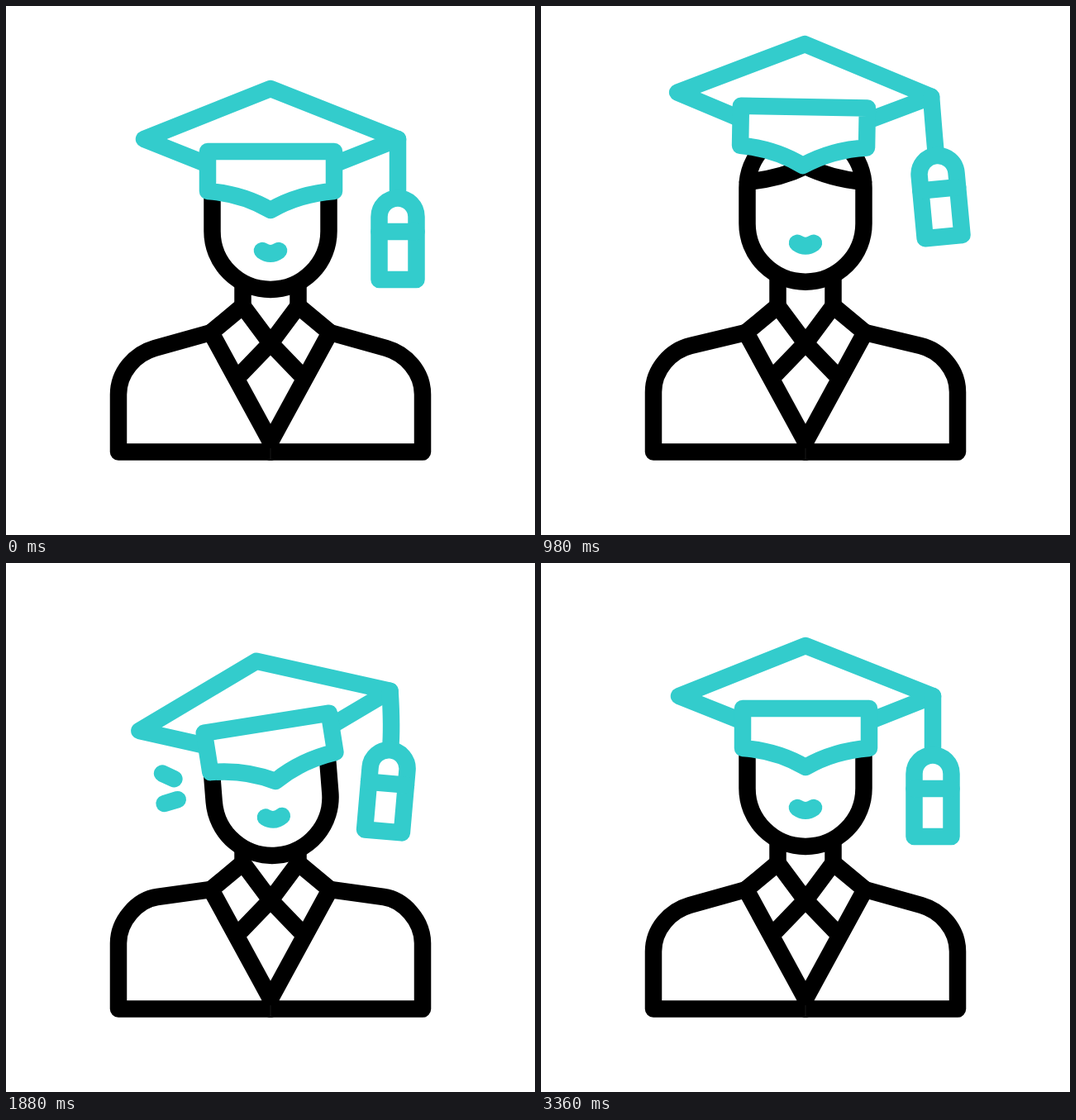
These frames come from a looping animation (640x640 px, 3.6 s). An HTML page:

```html
<!DOCTYPE html>
<html lang="en">
<head>
<meta charset="utf-8">
<title>Graduate</title>
<style>
  html, body { margin: 0; width: 100%; height: 100%; overflow: hidden; background: #fff; }
  svg { display: block; width: 100vw; height: 100vh; }
  .line { fill: none; stroke: #000; stroke-width: 20.5; stroke-linecap: round; stroke-linejoin: round; }
  .accent { stroke: #33cccc; }
  .solid { fill: #fff; }
</style>
</head>
<body>
<svg viewBox="0 0 640 640">
  <g class="line">
    <g id="half">
      <path id="shoulder"/>
      <path d="M286.5 322V363"/>
      <path d="M248 395L286.5 363L320 408L359.5 449"/>
      <path d="M248 395L320 527V539.600"/>
    </g>
    <use href="#half" transform="matrix(-1 0 0 1 640 0)"/>
  </g>
  <path d="M320 535V550" stroke="#333" stroke-width=".5"/>

  <g id="head" class="line">
    <path class="solid" d="M249.5 229a70.5 70.5 0 0 1 141 0V272.500a70.5 70.5 0 0 1 -141 0Z"/>
    <path d="M250 222Q290 218 320 203Q350 218 390 222"/>
    <path class="accent" d="M310 296Q320 303 330 296"/>
  </g>

  <g class="line accent">
    <g id="sparks">
      <path d="M216 267L177 249"/>
      <path d="M222 282L178 295"/>
    </g>
    <g id="cap">
      <path class="solid" d="M167 161L320 100L474 161L320 222Z"/>
      <path class="solid" d="M244 176H397V224Q355 227 320 247Q286 227 244 224Z"/>
    </g>
    <path id="string"/>
    <g id="tassel">
      <path class="solid" d="M-22.5 76V0a22.5 22.5 0 0 1 45 0V76Z"/>
      <path d="M-22.5 18H22.5"/>
    </g>
  </g>
</svg>
<script>
const LOOP = 3600;
// rest, crouch, peak, fall, land, rebound, rest
const BEATS = [0, 420, 1140, 1540, 1900, 2390, 2800];
// turning points of the tassel's pendulum
const SWINGS = [300, 780, 1170, 1565, 2110, 2480, 2800];

const el = id => document.getElementById(id);
const rad = deg => deg * Math.PI / 180;
const clamp = p => Math.max(0, Math.min(1, p));
const ease = p => clamp(p) ** 2 * (3 - 2 * clamp(p));

// Smooth curve from rest through the given values and back; it stands still at every turning point.
function through(t, times, ...values) {
  const v = [0, ...values, 0];
  const i = times.findIndex(time => time > t) - 1;
  if (i < 0) return 0;
  const slope = k => {
    const turns = (v[k] - v[k - 1]) * (v[k + 1] - v[k]);
    return turns > 0 ? (v[k + 1] - v[k - 1]) / (times[k + 1] - times[k - 1]) : 0;
  };
  const span = times[i + 1] - times[i], p = (t - times[i]) / span, q = 1 - p;
  return v[i] + (v[i + 1] - v[i]) * ease(p) + span * p * q * (slope(i) * q - slope(i + 1) * p);
}

function poseAt(t) {
  const capX = through(t, BEATS, 0, -4, -7.5, 1.5, -0.7);
  const capY = through(t, BEATS, 17, -64, -26, 17.5, -12.5);
  const capTurn = through(t, BEATS, -3.8, 3, 9.7, -9.2, 5.3);
  const headY = through(t, BEATS, 10, -12, 5.5, 11, 0);
  const lift = through(t, BEATS, 7, 2.5, 6.5, 10, 0);
  const swing = through(t, SWINGS, 9, -17.5, 18.6, -10, 2.5);
  // The head tilts with the cap only as far as the cap rests on it.
  const contact = clamp(1 + (capY - headY) / 45);
  return {
    capX, capY, capTurn, headY, lift, swing,
    headTurn: capTurn * contact / 2,
    sway: swing - capTurn * 0.45
  };
}

// Point at a distance below (x, y), turned clockwise by deg.
const hang = (x, y, len, deg) => [x - len * Math.sin(rad(deg)), y + len * Math.cos(rad(deg))];
const setTransform = (id, value) => el(id).setAttribute('transform', value);

function drawShoulder(lift) {
  const x = 180 + lift * 0.3, y = 414 - lift, side = 470 - lift;
  const bend = y + (y - 395) * 0.36;
  el('shoulder').setAttribute('d',
    `M248 395L${x} ${y}C${x - 24} ${bend} 136 ${side - 27} 136 ${side}V539.6H320`);
}

function drawTassel({ capX, capY, capTurn, swing, sway }) {
  const c = Math.cos(rad(capTurn)), s = Math.sin(rad(capTurn));
  const x = 320 + capX + 154 * c + 57 * s;
  const y = 218 + capY + 154 * s - 57 * c;
  const [ex, ey] = hang(x, y, 94, swing);
  const bend = hang(ex, ey, -50, sway);
  const end = hang(ex, ey, -22, sway);
  el('string').setAttribute('d', `M${x} ${y}Q${bend} ${end}`);
  setTransform('tassel', `translate(${ex} ${ey}) rotate(${sway})`);
}

function drawSparks(t) {
  const p = (t - 1750) / 260;
  const on = p > 0 && p < 1;
  el('sparks').style.display = on ? '' : 'none';
  if (!on) return;
  for (const path of el('sparks').children) {
    const len = path.getTotalLength();
    const tail = len * ease(p * 1.25 - 0.25), tip = len * ease(p * 1.25);
    path.setAttribute('stroke-dasharray', `${tip - tail} ${len * 2}`);
    path.setAttribute('stroke-dashoffset', -tail);
  }
}

function draw(t) {
  const p = poseAt(t);
  drawShoulder(p.lift);
  setTransform('head', `translate(0 ${p.headY}) rotate(${p.headTurn} 320 247)`);
  setTransform('cap', `translate(${p.capX} ${p.capY}) rotate(${p.capTurn} 320 218)`);
  drawTassel(p);
  drawSparks(t);
}

const start = performance.now();
function tick() {
  draw((performance.now() - start) % LOOP);
  requestAnimationFrame(tick);
}
tick();
</script>
</body>
</html>
```
